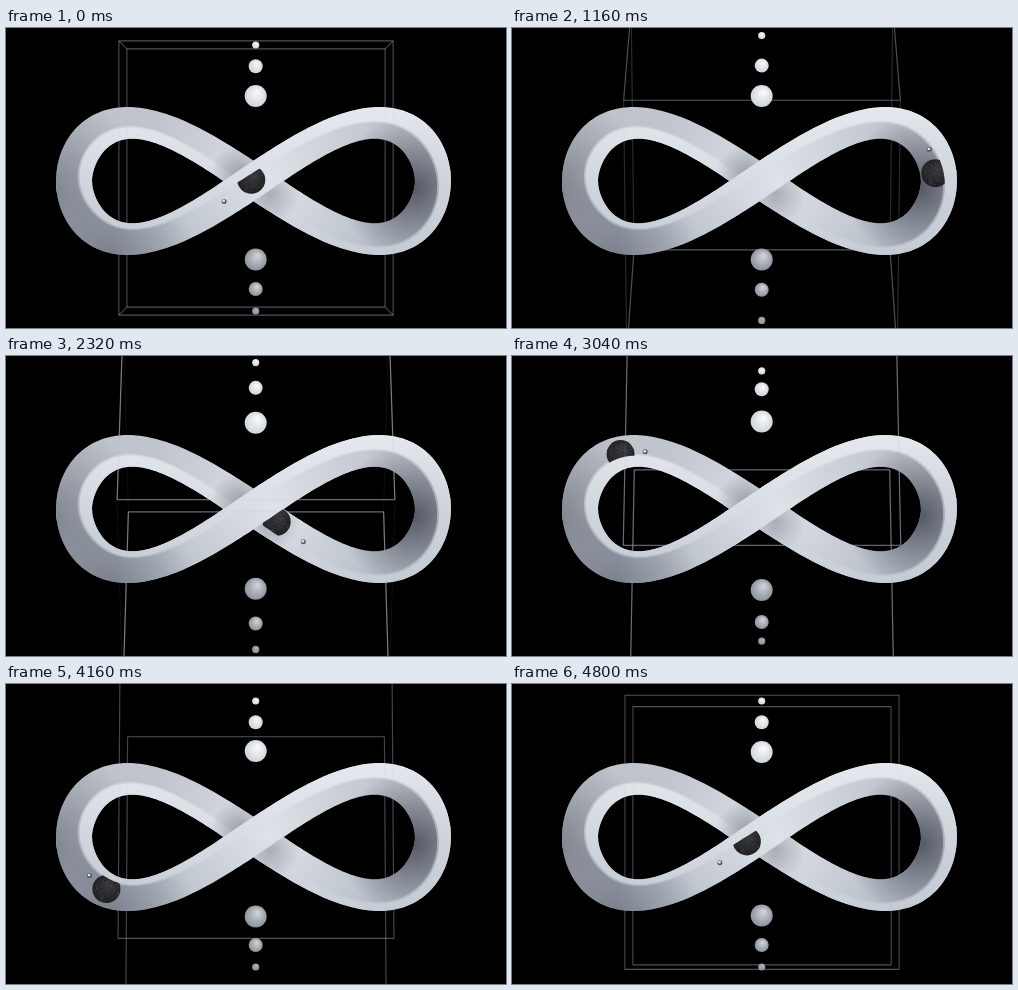
An HTML page with a canvas for the animation above (4840 ms loop, 500 px wide and 300 px high).

```html
<!DOCTYPE html>
<html lang="en">
<head>
<meta charset="utf-8">
<title>Infinity loop</title>
<style>
  html, body { margin: 0; width: 100%; height: 100%; overflow: hidden; background: #000; }
  canvas { display: block; width: 500px; height: 300px; }
</style>
</head>
<body>
<canvas id="stage" width="500" height="300"></canvas>
<script>
const LOOP = 4840, TAU = Math.PI * 2, DEG = TAU / 360;
const { sin, cos } = Math;
const ctx = document.getElementById('stage').getContext('2d');

// Figure eight; w runs across the band from the rim edge (-1) to the wall edge (1).
const bandPoint = (a, w) => [
  247.5 + w * (6 + 24 * cos(2 * a)) + 185 * (sin(a) + 0.03 * sin(3 * a)),
  153 - sin(2 * a) * (55.5 - 26 * w * sin(a)) - 6 * sin(4 * a)
];

const RIM = () => -1, WALL = () => 1;
const CREASE = a => -0.46 + 0.2 * sin(2 * a) + 0.14 * sin(a) ** 2;
const SOFT_CREASE = a => CREASE(a) + 0.1;

function ribbon(from, to, sideA, sideB) {
  const path = new Path2D();
  const add = (deg, side) => path.lineTo(...bandPoint(deg * DEG, side(deg * DEG)));
  for (let d = from; d <= to; d++) add(d, sideA);
  for (let d = to; d >= from; d--) add(d, sideB);
  path.closePath();
  return path;
}

function blob(g, x, y, r, rgb, alpha) {
  const fill = g.createRadialGradient(x, y, 0, x, y, r);
  fill.addColorStop(0, `rgba(${rgb},${alpha})`);
  fill.addColorStop(0.5, `rgba(${rgb},${alpha * 0.5})`);
  fill.addColorStop(1, `rgba(${rgb},0)`);
  g.fillStyle = fill;
  g.fillRect(x - r, y - r, 2 * r, 2 * r);
}

function vertical(g, top, bottom) {
  const fill = g.createLinearGradient(0, 80, 0, 228);
  fill.addColorStop(0, top);
  fill.addColorStop(1, bottom);
  return fill;
}

function paintBand(g, from, to, isBack) {
  const band = ribbon(from, to, RIM, WALL);
  g.save();
  g.fillStyle = vertical(g, '#c0c5cd', '#b6bcc6');
  g.fill(band);
  g.clip(band);
  blob(g, 265, 150, 130, '226,230,236', 0.9);
  blob(g, 45, 160, 95, '95,100,112', 0.65);
  blob(g, 105, 232, 85, '95,100,113', 0.7);
  blob(g, 408, 160, 75, '72,77,90', 0.9);
  g.fillStyle = vertical(g, '#e8ecf1', '#c8ced7');
  g.globalAlpha = 0.5;
  g.fill(ribbon(from, to, RIM, SOFT_CREASE));
  g.globalAlpha = 0.8;
  g.fill(ribbon(from, to, RIM, CREASE));
  g.globalAlpha = 1;
  if (isBack) {
    blob(g, 234, 146, 30, '95,100,112', 0.5);
    blob(g, 264, 166, 30, '95,100,112', 0.4);
  }
  g.restore();
}

const body = document.createElement('canvas');
body.width = 500;
body.height = 300;
paintBand(body.getContext('2d'), 85, 275, true);
paintBand(body.getContext('2d'), -90, 90, false);

const overpass = ribbon(-45, 45, RIM, WALL);
const frontWall = ribbon(-130, 130, CREASE, WALL);
const backWall = ribbon(50, 310, CREASE, WALL);

function disc(x, y, r, fill) {
  ctx.fillStyle = fill;
  ctx.beginPath();
  ctx.arc(x, y, r, 0, TAU);
  ctx.fill();
}

function sphere(x, y, r, light, dark) {
  const fill = ctx.createRadialGradient(x + r * 0.2, y - r * 0.4, 0, x, y, r * 1.1);
  fill.addColorStop(0, light);
  fill.addColorStop(1, dark);
  disc(x, y, r, fill);
}

// Wire cube turning a quarter about its horizontal axis.
function drawCage(t, strength) {
  const D = 4450, half = 133, turn = t / LOOP, phi = (turn - 0.5) * TAU / 4;
  const glow = cos(2 * phi) ** 4, fading = 0.36 * Math.max(0, 1 - 1.7 * turn);
  const corners = [0, 1, 2, 3].map(k => {
    const a = phi + k * TAU / 4, s = D / (D - half * Math.SQRT2 * cos(a));
    return { x: half * s, y: 150 + half * Math.SQRT2 * sin(a) * s };
  });
  const line = (x1, y1, x2, y2, alpha) => {
    ctx.strokeStyle = `rgba(165,168,186,${alpha * strength})`;
    ctx.beginPath();
    ctx.moveTo(x1, y1);
    ctx.lineTo(x2, y2);
    ctx.stroke();
  };
  ctx.lineWidth = 1.2;
  corners.forEach((p, k) => {
    const q = corners[(k + 1) % 4];
    line(250 - p.x, p.y, 250 + p.x, p.y, 0.42 + 0.15 * glow);
    for (const side of [-1, 1])
      line(250 + side * p.x, p.y, 250 + side * q.x, q.y, k % 2 ? 0.34 + 0.35 * glow : fading);
  });
}

// Each pair swings away from the centre and back, the smaller ones first.
const beads = [
  { top: 17, bottom: 283, r: 3.6, travel: 13.5 },
  { top: 38.3, bottom: 261, r: 7, travel: 6.6 },
  { top: 68, bottom: 231.5, r: 11, travel: 2.5 }
];

function drawBeads(t) {
  beads.forEach(({ top, bottom, r, travel }, i) => {
    const p = Math.min(1, Math.max(0, (t - 100 - 700 * i) / 3370));
    const d = travel * sin(Math.PI * p) ** 2;
    sphere(249.7, top - d, r, '#fafbfd', '#cdd2d9');
    sphere(249.7, bottom + d, r, r > 5 ? '#d3d7dd' : '#b0b4bc', '#888d97');
  });
}

const orbit = a => [
  245 + 184 * (sin(a) + 0.03 * sin(3 * a)),
  152 - 54 * sin(2 * a)
];

let seed = 7;
const random = () => (seed = seed * 16807 % 2147483647) / 2147483647;
const specks = Array.from({ length: 70 }, () => {
  const a = random() * TAU, r = 13 * Math.sqrt(random());
  return [r * cos(a), r * sin(a), random()];
});

function drawBall(a) {
  const [x, y] = orbit(a), isBack = cos(a) < 0;
  ctx.save();
  ctx.clip(isBack ? backWall : frontWall);
  sphere(x, y, 14, '#3b3b3f', '#202023');
  for (const [dx, dy, v] of specks) {
    ctx.fillStyle = v > 0.5 ? 'rgba(95,95,100,.45)' : 'rgba(8,8,10,.5)';
    ctx.fillRect(x + dx, y + dy, 1, 1);
  }
  ctx.restore();

  // A tiny satellite trails the ball, bobbing slightly.
  const lag = (10.7 - 2.9 * cos(2 * a)) * DEG;
  const [mx, my] = orbit(a - lag);
  const sy = my - 0.8 + 3.5 * cos(2 * a) + 4.3 * cos(4 * a);
  disc(mx, sy, 2.5, '#55565c');
  disc(mx - 0.4, sy - 0.5, 1.4, '#e0e2e8');

  if (isBack) {
    ctx.save();
    ctx.clip(overpass);
    ctx.drawImage(body, 0, 0);
    ctx.restore();
  }
}

function draw() {
  const t = performance.now() % LOOP;
  ctx.fillStyle = '#000';
  ctx.fillRect(0, 0, 500, 300);
  drawCage(t, 1);
  ctx.drawImage(body, 0, 0);
  drawBall(t / LOOP * TAU);
  drawCage(t, 0.22);
  drawBeads(t);
  requestAnimationFrame(draw);
}
draw();
</script>
</body>
</html>
```
